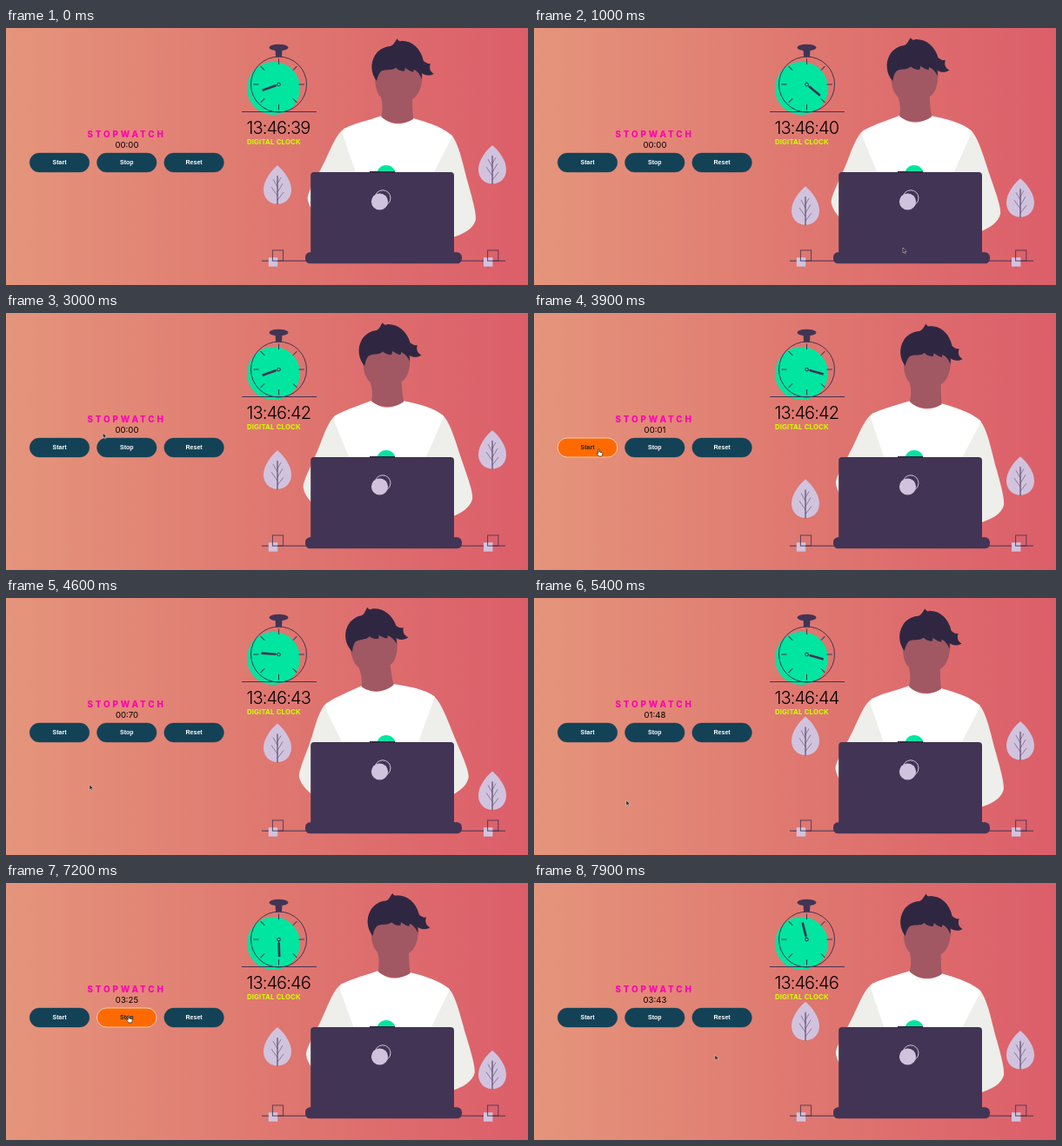
Write an HTML page that moves like this. It is 600 by 296 pixels and loops after 8000 ms.

```html
<!DOCTYPE html>
<html lang="en">
<head>
<meta charset="utf-8">
<title>Stopwatch</title>
<style>
html, body { margin: 0; width: 100%; height: 100%; overflow: hidden; }
svg { display: block; width: 600px; height: 296px; }
text { font-family: Inter, "Open Sans", sans-serif; }
.button text { font: bold 7px "Liberation Sans", Arial, sans-serif; text-anchor: middle; fill: #fff; }
.button rect { fill: #134257; stroke: #134257; stroke-width: .4; }
.button.hover rect { fill: #ff6a00; stroke: #e6ddd8; stroke-width: .8; }
.button.hover text { fill: #232323; }
.ink { fill: #423454; }
.line { fill: none; stroke: #423454; stroke-width: 1; }
.thin { stroke-width: .5; }
.thick { stroke-width: 2.6; }
.lilac { fill: #d1c3de; }
</style>
</head>
<body>
<svg viewBox="0 0 600 296">
  <defs>
    <linearGradient id="sky">
      <stop offset="0" stop-color="#e5957c"/>
      <stop offset=".5" stop-color="#df7870"/>
      <stop offset="1" stop-color="#dc5e6a"/>
    </linearGradient>
    <g id="leaf">
      <path class="lilac" d="M0 0C7 6 16 17 16 28C16 38 9 44.5 0 44.5C-9 44.5 -16 38 -16 28C-16 17 -7 6 0 0Z"/>
      <path class="line" d="M0 12V45"/>
      <path class="line thin" d="M0 21L4 14M0 25L-5 16M0 31L6 21M0 35L-7 25M0 40L7 31"/>
    </g>
    <g id="squares">
      <rect class="lilac" x="0" y="264.3" width="10.4" height="10.4"/>
      <rect class="line" x="4.6" y="256" width="12.2" height="12.2" stroke-opacity=".85"/>
    </g>
  </defs>

  <rect width="600" height="296" fill="url(#sky)"/>

  <text x="93.4" y="126.3" font-size="9.9" font-weight="800" letter-spacing="2.9" fill="#ff00b4">STOPWATCH</text>
  <text id="elapsed" x="139" y="137.8" text-anchor="middle" font-size="9.6"></text>
  <g id="buttons"></g>

  <circle cx="307.5" cy="69.5" r="30.6" fill="#00e5a0"/>
  <g id="dial">
    <ellipse class="ink" cx="313.5" cy="22.6" rx="11" ry="3.9"/>
    <path class="ink" d="M309.5 24H317.5L317 33.5H310Z"/>
    <circle class="line" cx="313.5" cy="65" r="32"/>
    <path class="line" d="M271 96.5H357"/>
  </g>
  <g id="hand">
    <path class="line" d="M0 -2V-5"/>
    <path class="line thick" d="M0 -3.5V-20"/>
    <circle class="line" r="1.8"/>
  </g>
  <text id="clock" x="276.5" y="122" font-size="20" font-weight="300" letter-spacing="-.9"></text>
  <text x="277" y="134.4" font-size="7.8" font-weight="700" letter-spacing=".15" fill="#d0ff00">DIGITAL CLOCK</text>

  <path class="line" d="M294 268.2H574"/>
  <use href="#squares" x="301.8"/>
  <use href="#squares" x="549"/>
  <use id="leftLeaf" href="#leaf"/>
  <use id="rightLeaf" href="#leaf"/>

  <g id="person">
    <path fill="#eeeeea" d="M390 115C381 121 375 136 368 151C359 170 347 188 347 196C348 206 355 214 366 225H410V125Z"/>
    <path fill="#eeeeea" d="M512 123C521 132 525 155 532 181C538 203 541 215 540 222C537 232 526 238 512 242L480 210V150Z"/>
    <path fill="#fff" d="M433 101C418 106 401 110 391 115C386 118 388 122 389 126L402 165V250H490V171L514 125C504 115 486 109 468 104C460 113 440 113 433 101Z"/>
    <path fill="#a15863" d="M426 50C424 62 426 74 432 80C434 88 434 95 432 102C440 111 460 112 469 105C468 97 468 90 468 82C476 78 480 66 480 48L455 36Z"/>
    <path fill="#2f2742" d="M427 61C420 52 420 40 425 32C428 26 436 21 443 21C447 20 448 16 451 12.5C452 15 454 16 456 15C468 15 478 24 481 38C484 41 488 42 489 41C487 47 489 51 493 53C488 56 482 55 479 52L479 59C477 54 474 50 470 48L469 51C465 50 462 48 460 46L459 50C455 50 452 49 449 46C444 50 437 47 432 50C429 53 428 57 427 61Z"/>
  </g>
  <circle cx="437" cy="169" r="11" fill="#00e5a0"/>

  <rect class="ink" x="350.2" y="166" width="164.8" height="102" rx="4"/>
  <rect class="ink" x="344" y="258.3" width="180" height="13" rx="5.5"/>
  <rect x="418" y="165" width="29" height="1.6" fill="#2f2742"/>
  <circle cx="433" cy="195.8" r="9" fill="none" stroke="#d1c3de"/>
  <circle class="lilac" cx="429.5" cy="200" r="9.6"/>

  <g id="cursor">
    <path id="arrow" fill="#222" stroke="#ddd" stroke-width=".5" d="M0 0V6L1.4 4.8L2.4 7L3.3 6.5L2.4 4.5H4.2Z"/>
    <path id="pointer" fill="#fff" stroke="#222" stroke-width=".7" d="M-.7 .4C-.7 -.5 .6 -.5 .6 .4V3L3.8 3.7C4.6 4 4.3 6.5 3.3 8H0L-2.5 4.7C-2.5 3.8 -1.5 4 -.7 4.8Z"/>
  </g>
</svg>
<script>
const LOOP = 8000, STEP = 100;
const $ = id => document.getElementById(id);
const svgNS = "http://www.w3.org/2000/svg";
const two = n => String(n).padStart(2, "0");

const buttons = ["Start", "Stop", "Reset"].map((label, i) => {
  const x = 27.2 + i * 77.3, group = document.createElementNS(svgNS, "g");
  group.setAttribute("class", "button");
  group.innerHTML = `<rect x="${x}" y="144" width="68.6" height="22" rx="11"/>
    <text x="${x + 34.3}" y="157.4">${label}</text>`;
  $("buttons").append(group);
  return { x, group };
});

for (let a = 0; a < 360; a += 45) {
  const tick = document.createElementNS(svgNS, "path");
  tick.setAttribute("class", "line");
  tick.setAttribute("d", "M313.5 35.5V42");
  tick.setAttribute("transform", `rotate(${a} 313.5 65)`);
  $("dial").append(tick);
}

// time, x, y of the pointer tip
const route = [
  [100, 60, 235], [900, 424, 253], [1300, 424, 253], [1800, 402, 130],
  [2200, 357, 30], [2700, 184, 105], [3200, 72, 156], [3900, 74.5, 157],
  [4200, 76, 160], [4600, 96, 215], [5400, 106, 233], [6100, 138, 152],
  [6600, 140, 152], [7300, 141, 153], [7900, 208, 198]
];

function cursorAt(t) {
  const i = Math.max(1, route.findIndex(p => p[0] >= t));
  const [t0, x0, y0] = route[i - 1], [t1, x1, y1] = route[i];
  const k = (t - t0) / (t1 - t0), s = k * k * (3 - 2 * k);
  return [x0 + (x1 - x0) * s, y0 + (y1 - y0) * s];
}

// Rises from 0 to 1 at the peak time and falls back, once per period.
function pulse(t, period, peak, power) {
  const phase = (t - peak) / period;
  return (1 - 2 * Math.abs(phase - Math.round(phase))) ** power;
}

const place = (id, transform) => $(id).setAttribute("transform", transform);

function draw(t) {
  place("person", `rotate(${-11 * pulse(t, 2000, 710, 3)} 420 275)`);
  place("leftLeaf", `translate(312 ${135 + 83 * pulse(t, 3000, 660, 2.2)})`);
  place("rightLeaf", `translate(559 ${135 + 86 * pulse(t, 3000, 1430, 2.4)})`);
  place("hand", `translate(313.5 65) rotate(${250 + t * .24})`);

  $("clock").textContent = "13:46:" + (39 + Math.floor((t + 50) / 1000));
  const hundredths = Math.round(Math.min(343, Math.max(0, (t - 3890) * .0983)));
  $("elapsed").textContent = two(Math.floor(hundredths / 100)) + ":" + two(hundredths % 100);

  const [x, y] = cursorAt(t);
  let hovering = false;
  for (const { x: left, group } of buttons) {
    const over = t >= 100 && x > left && x < left + 68.6 && y > 144 && y < 166;
    group.classList.toggle("hover", over);
    hovering = hovering || over;
  }
  place("cursor", `translate(${x} ${y})`);
  $("cursor").style.display = t < 100 ? "none" : "";
  $("arrow").style.display = hovering ? "none" : "";
  $("pointer").style.display = hovering ? "" : "none";
}

function frame() {
  draw(Math.floor(performance.now() % LOOP / STEP) * STEP);
  requestAnimationFrame(frame);
}
frame();
</script>
</body>
</html>
```
